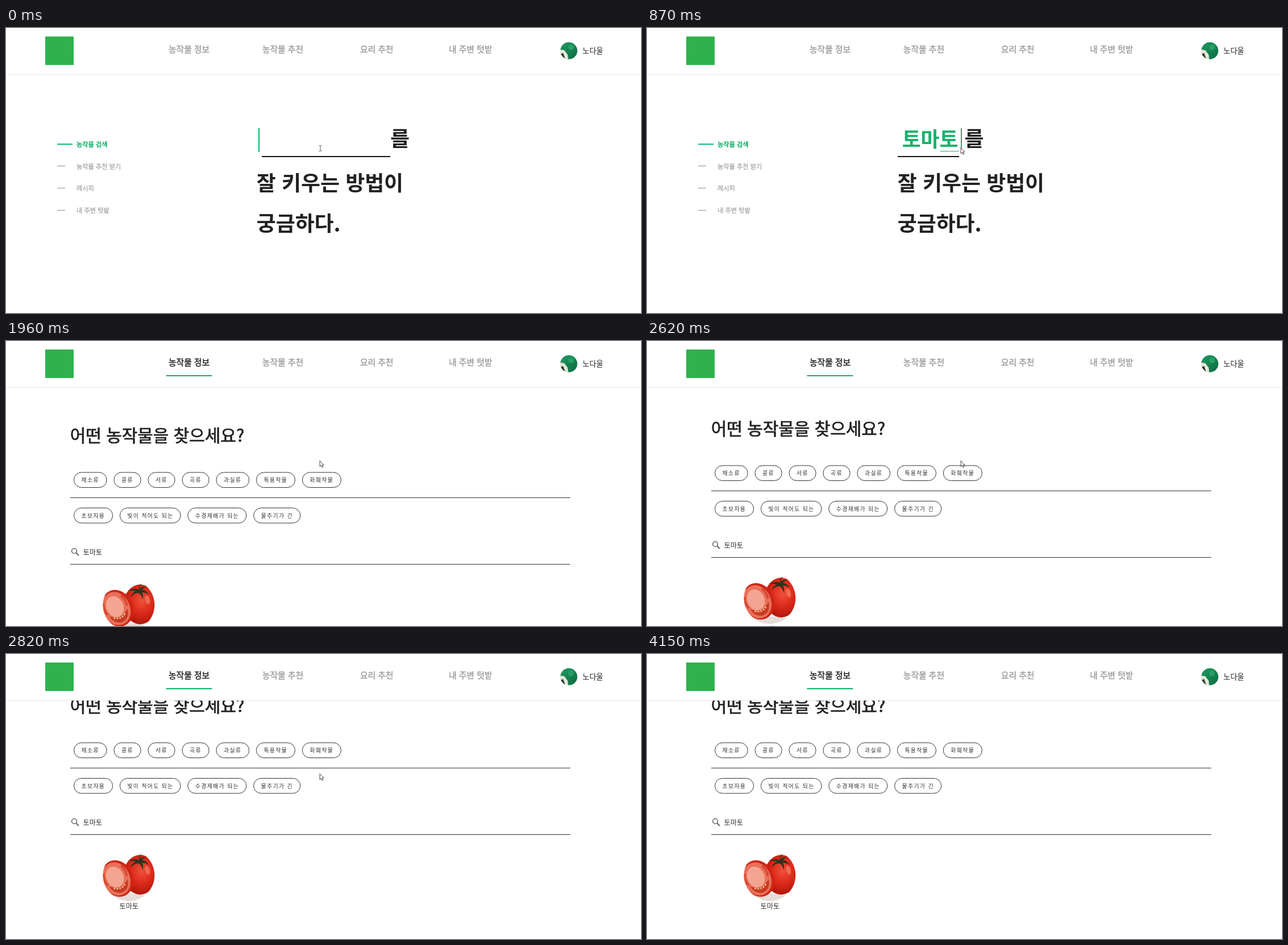
Animation of 1117x501 px, one loop 5.02 s. Source, as an HTML page:

```html
<!DOCTYPE html>
<html lang="ko">
<head>
<meta charset="utf-8">
<title>농작물 검색</title>
<style>
html, body { margin: 0; width: 100%; height: 100%; overflow: hidden; background: #fff; }
svg { display: block; width: 100vw; height: 100vh; font-family: "Noto Sans CJK KR", "Noto Sans CJK", "Noto Sans KR", sans-serif; }
text { white-space: pre; }
/* medium weight: regular with a hairline outline */
.mid text { fill: currentColor; stroke: currentColor; stroke-width: .025em; }
.nav { font-size: 14.8px; color: #9c9c9c; }
.side { font-size: 11.2px; color: #a6a6a6; }
.side .on { color: #0fb269; stroke-width: .045em; }
.hero { font-size: 36.9px; font-weight: 700; fill: #222; }
.typed { font-size: 35.8px; font-weight: 700; fill: #0fb269; }
.title { font-size: 29.95px; color: #222; }
.chips text { font-size: 9.88px; letter-spacing: 1.36px; fill: #333; }
.chips rect { fill: none; stroke: #333; }
.small { font-size: 12.2px; fill: #333; }
.green { fill: #0fb269; }

.a { animation: 5020ms step-end -6ms infinite; }
#home { animation-name: home; }
#list { animation-name: list; opacity: 0; }
#s0 { animation-name: s0; opacity: 0; }
#s1 { animation-name: s1; opacity: 0; }
#s2 { animation-name: s2; opacity: 0; }
#s3 { animation-name: s3; opacity: 0; }
#s4 { animation-name: s4; opacity: 0; }
#s5 { animation-name: s5; opacity: 0; }
#s6 { animation-name: s6; opacity: 0; }
#blink0 { animation-name: blink0; opacity: 0; }
#blink6 { animation-name: blink6; opacity: 0; }
#compose { animation-name: compose; opacity: 0; }
#tab { animation-name: tab; }
#bar { animation-name: bar; transform: scaleX(0); transform-origin: 322px 61px; }
#photo { animation-name: photo; opacity: 0; }
#page { animation-name: scroll; }
#arrow { animation-name: arrow; opacity: 0; }

@keyframes home { 0% { opacity: 1 } 33.66%, to { opacity: 0 } }
@keyframes list { 33.66%, to { opacity: 1 } }
@keyframes s0 { 0% { opacity: 1 } 6.77% { opacity: 0 } }
@keyframes s1 { 6.77% { opacity: 1 } 8.96% { opacity: 0 } }
@keyframes s2 { 8.96% { opacity: 1 } 11.15% { opacity: 0 } }
@keyframes s3 { 11.15% { opacity: 1 } 13.34% { opacity: 0 } }
@keyframes s4 { 13.34% { opacity: 1 } 16.13% { opacity: 0 } }
@keyframes s5 { 16.13% { opacity: 1 } 17.33% { opacity: 0 } }
@keyframes s6 { 17.33% { opacity: 1 } 33.66% { opacity: 0 } }
@keyframes blink0 { 0% { opacity: 1 } 3.98% { opacity: 0 } }
@keyframes blink6 { 0% { opacity: 1 } 26.69% { opacity: 0 } }
@keyframes compose { 0% { opacity: 1 } 29.48% { opacity: 0 } }
@keyframes tab {
  33.66% { color: #8a8a8a } 34.86% { color: #555 } 36.25% { color: #333 }
  37.64% { color: #252525 } 39.04%, to { color: #1c1c1c }
}
@keyframes bar {
  33.66% { transform: scaleX(.1) } 34.86% { transform: scaleX(.51) } 36.25% { transform: scaleX(.83) }
  37.64% { transform: scaleX(.96) } 39.04%, to { transform: none }
}
@keyframes photo { 36.25%, to { opacity: 1 } }
@keyframes scroll {
  52.19% { transform: translateY(-12px) } 53.58% { transform: translateY(-44px) }
  54.78% { transform: translateY(-68px) } 56.17%, to { transform: translateY(-75px) }
}
@keyframes arrow {
  6.77% { opacity: 1; transform: none }
  78.68% { opacity: 1; transform: translate(24px, -5px) }
  79.88% { opacity: 1; transform: translate(168px, 30px) }
  81.27% { opacity: 1; transform: translate(370px, 115px) }
  82.66%, to { opacity: 0 }
}
</style>
</head>
<body>
<svg viewBox="0 0 1117 501">
  <defs>
    <clipPath id="below"><rect y="82" width="1117" height="419"/></clipPath>
    <clipPath id="round"><circle cx="216" cy="464" r="45.3"/></clipPath>
    <clipPath id="face"><circle cx="990" cy="40" r="15"/></clipPath>
    <radialGradient id="skin" cx=".55" cy=".4" r=".65">
      <stop offset="0" stop-color="#f0523a"/><stop offset=".5" stop-color="#dc2a1a"/><stop offset="1" stop-color="#a81308"/>
    </radialGradient>
    <linearGradient id="leaf" x2="1" y2="1">
      <stop offset="0" stop-color="#1f9c62"/><stop offset="1" stop-color="#0c6a40"/>
    </linearGradient>
  </defs>

  <g id="home" class="a">
    <g class="side mid">
      <rect class="green" x="90" y="203.3" width="27" height="2"/>
      <path d="M90 242.5h14M90 281.5h14M90 320.5h14" stroke="#aaa" stroke-width="1.4"/>
      <text class="on" x="124" y="208.8">농작물 검색</text>
      <text x="124" y="247.8">농작물 추천 받기</text>
      <text x="124" y="286.3">레시피</text>
      <text x="124" y="325">내 주변 텃밭</text>
    </g>
    <g class="hero">
      <text x="440.8" y="285.6">잘 키우는 방법이</text>
      <text x="440.8" y="357.4">궁금하다.</text>
    </g>
    <g id="s0" class="a">
      <rect id="blink0" class="a green" x="444" y="176" width="2" height="42"/>
      <rect x="450" y="225" width="226" height="2" fill="#111"/>
      <text class="hero" x="676" y="207.7">를</text>
      <path d="M550.5 206.5q2 0 2.5 1q.5-1 2.5-1M553 207.5v8M550.5 216.5q2 0 2.5-1q.5 1 2.5 1" fill="none" stroke="#555"/>
    </g>
    <g id="steps"></g>
  </g>

  <g id="list" class="a">
    <g clip-path="url(#below)">
      <g id="page" class="a">
        <g class="title mid"><text x="112.7" y="177">어떤 농작물을 찾으세요?</text></g>
        <g class="chips" id="chips"></g>
        <path d="M113 275.5H992.5M113 392.5H992.5" stroke="#333"/>
        <g fill="none" stroke="#555" stroke-width="1.4">
          <circle cx="120" cy="369" r="4.4"/><path d="M123.3 372.3l4.7 4.7" stroke-width="1.8"/>
        </g>
        <text class="small" x="135.5" y="375.5">토마토</text>
        <g id="photo" class="a">
          <g clip-path="url(#round)">
            <ellipse cx="212" cy="503" rx="36" ry="7" fill="#e6dcd9"/>
            <ellipse cx="236" cy="463" rx="29" ry="35" fill="url(#skin)"/>
            <ellipse cx="249" cy="455" rx="4" ry="8" fill="#f58a72" opacity=".6" transform="rotate(-15 249 455)"/>
            <path d="M234 437q-8-4-19 2q9-1 13 1q-8 4-8 10q5-7 13-7q7 4 7 12q3-7-1-13q7 0 12 4q-4-8-12-9q4-4 8-5q-7-1-11 3q-2-5 4-9q-7 2-6 11z" fill="#2f3320"/>
            <g transform="rotate(-24 195 470)">
              <ellipse cx="196" cy="470" rx="27" ry="33" fill="#cf2415"/>
              <ellipse cx="194" cy="470" rx="24" ry="30" fill="#e9705a"/>
              <ellipse cx="193" cy="466" rx="15" ry="19" fill="#f4a591"/>
              <path d="M177 477q17 16 35 1q-3 17-18 18q-14-2-17-19z" fill="#c93a22"/>
              <path d="M183 483q11 9 23 0" fill="none" stroke="#f3b98c" stroke-width="3" stroke-dasharray="3 2"/>
              <path d="M177 452q-6 13-1 22M211 452q5 12 2 21" fill="none" stroke="#d64a33" stroke-width="4"/>
            </g>
          </g>
          <text class="small" x="199.5" y="522.8">토마토</text>
        </g>
      </g>
    </g>
  </g>

  <g id="header">
    <rect y="81" width="1117" height="1" fill="#e6e6e6"/>
    <rect x="69" y="15" width="50" height="50" fill="#2fb24c"/>
    <g class="nav mid">
      <text id="tab" class="a" x="286" y="43.1">농작물 정보</text>
      <text x="450.8" y="43.1">농작물 추천</text>
      <text x="622.8" y="43.1">요리 추천</text>
      <text x="779" y="43.1">내 주변 텃밭</text>
    </g>
    <rect id="bar" class="a green" x="281.5" y="60" width="81" height="2"/>
    <g clip-path="url(#face)">
      <rect x="975" y="25" width="30" height="30" fill="url(#leaf)"/>
      <path d="M975 38l7 1l6 8l1 8h-14z" fill="#e6e8da"/>
      <path d="M975 46l5-2l4 11h-9z" fill="#2b3a2a"/>
      <circle cx="994" cy="34" r="5" fill="#2fb274" opacity=".6"/>
    </g>
    <text x="1014" y="45" font-size="13.2" fill="#222">노다울</text>
  </g>

  <path id="arrow" class="a" d="M552 210.5v10.3l2.4-2.2l1.7 3.7l1.7-.8l-1.7-3.5h3z" fill="#fff" stroke="#333" stroke-width=".9"/>
</svg>
<script>
const fill = (id, html) => document.getElementById(id).innerHTML = html;

// Hangul composition, one key at a time
const step = (word, i) => {
  const n = word.length, x = 444.5 + 1.4 * n, end = 36 * n, last = i === 5;
  return `<g id="s${i + 1}" class="a">
    <text class="typed" x="${x}" y="209.2">${word}</text>
    <rect ${last ? 'id="compose"' : ''} class="a green" x="${x + 33.3 * (n - 1)}" y="216" width="33.3" height="1"/>
    <rect ${last ? 'id="blink6"' : ''} class="a green" x="${444 + end}" y="176" width="2" height="42"/>
    <rect x="441" y="225" width="${end}" height="2" fill="#111"/>
    <text class="hero" x="${450.5 + end}" y="207.7">를</text>
  </g>`;
};
fill('steps', ['ㅌ', '토', '톰', '토마', '토맡', '토마토'].map(step).join(''));

const row = (words, y) => {
  let x = 119.5;
  return words.map(word => {
    const spaces = word.split(' ').length - 1;
    const w = 26.3 + 10.45 * (word.length - spaces) + 3.57 * spaces;
    const chip = `<rect x="${x}" y="${y}" width="${w}" height="26.5" rx="13.25"/><text x="${x + 13}" y="${y + 17.2}">${word}</text>`;
    x += w + 12.8;
    return chip;
  }).join('');
};
fill('chips',
  row(['채소류', '콩류', '서류', '곡류', '과실류', '특용작물', '화훼작물'], 231) +
  row(['초보자용', '빛이 적어도 되는', '수경재배가 되는', '물주기가 긴'], 293.5));
</script>
</body>
</html>
```
